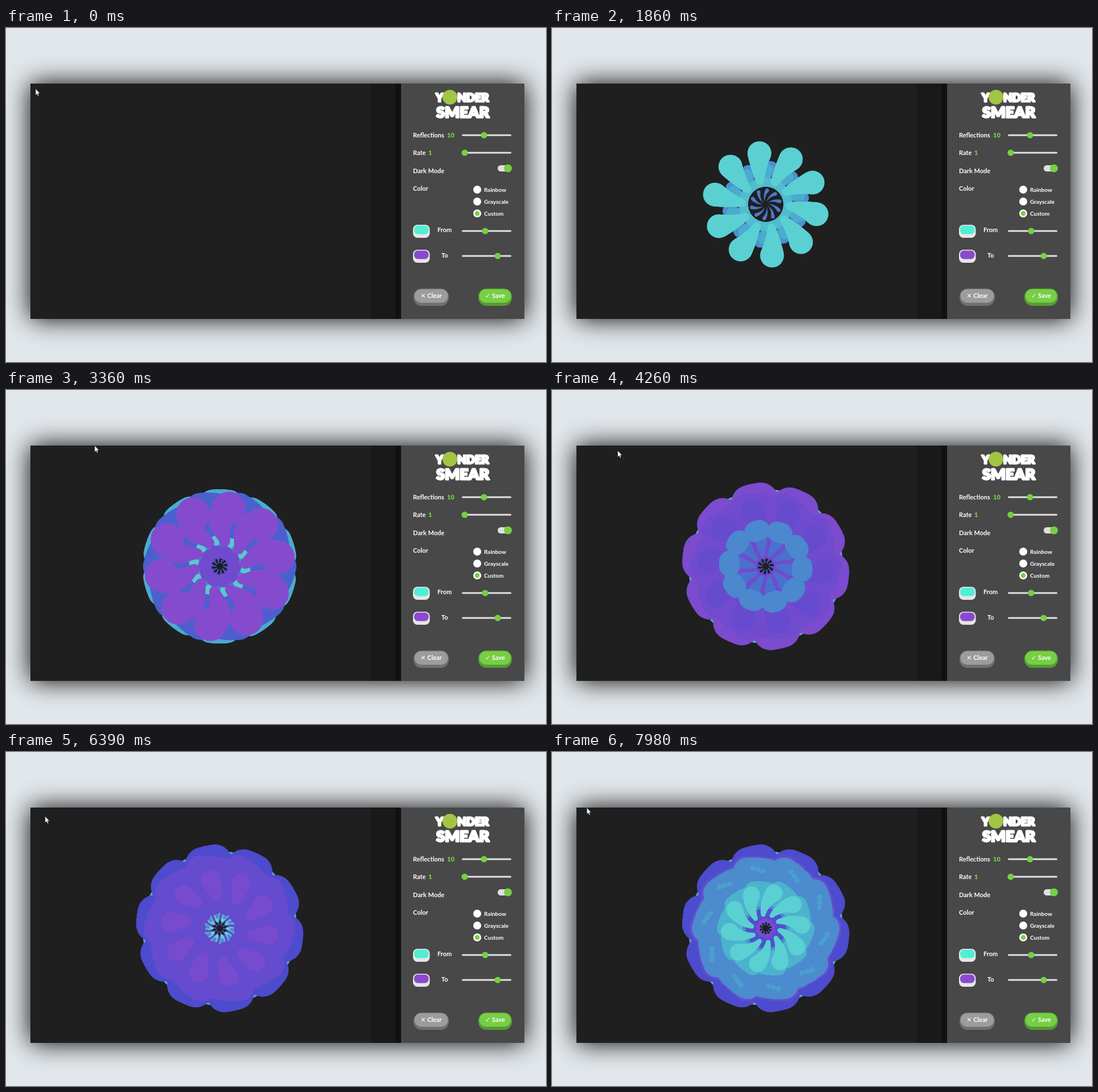
Recreate the animation shown at these times as an HTML page with a canvas. Size 950 by 589 pixels, loop 8 s.

```html
<!DOCTYPE html>
<html lang="en">
<head>
<meta charset="utf-8">
<title>Kaleidoscope painter</title>
<style>
  html, body { margin: 0; width: 100%; height: 100%; overflow: hidden; background: #e2e7eb; }
  #stage { position: relative; width: 950px; height: 589px; overflow: hidden; }
  #card { position: absolute; left: 43px; top: 98px; width: 869px; height: 415px; background: #1f1f1f; box-shadow: 0 0 42px #000; }
  canvas, svg { position: absolute; left: 0; top: 0; }
  text { font: 700 11px Lato, "DejaVu Sans", sans-serif; fill: #fff; }
  .small { font-size: 10px; }
  .value { font-weight: 900; fill: #76cf45; }
  .logo { font-weight: 900; stroke: #fff; stroke-width: 3; stroke-linejoin: round; }
</style>
</head>
<body>
<div id="stage">
  <div id="card"></div>
  <canvas width="950" height="589"></canvas>
  <svg width="950" height="589">
    <defs><clipPath id="board"><rect x="43" y="98" width="599" height="415"/></clipPath></defs>
    <rect x="642" y="98" width="43" height="415" fill="#191919"/>
    <rect x="685" y="98" width="10" height="415" fill="#111"/>
    <rect x="695" y="98" width="217" height="415" fill="#484848"/>

    <text class="logo" x="756" y="130" style="font-size:20px">Y</text>
    <text class="logo" x="794" y="130" style="font-size:20px">NDER</text>
    <text class="logo" x="757" y="158" style="font-size:27px">SMEAR</text>
    <circle cx="781" cy="122" r="13" fill="#a3c544"/>

    <text x="716" y="193">Reflections</text><text class="value" x="776" y="193">10</text>
    <text x="716" y="224">Rate</text><text class="value" x="743" y="224">1</text>
    <text x="716" y="256">Dark Mode</text>
    <text x="716" y="287">Color</text>
    <text x="759" y="360">From</text>
    <text x="766" y="405">To</text>

    <rect x="865" y="242" width="23" height="11" rx="5.5" fill="#e0e0e0"/>
    <circle cx="883" cy="247.5" r="7" fill="#76cf45"/>
    <g id="controls"></g>

    <g clip-path="url(#board)">
      <path id="cursor" d="M0 0V11.5L2.6 9.2 4.3 13 6.1 12.2 4.4 8.5H7.8Z" fill="#fff" stroke="#111" stroke-width=".6"/>
    </g>
  </svg>
</div>
<script>
const LOOP = 8000, STEP = 30, ARMS = 10, SECTOR = 360 / ARMS, CX = 376, CY = 311;
const ctx = document.querySelector('canvas').getContext('2d');
const cursor = document.getElementById('cursor');
const mix = (a, b, k) => a + (b - a) * k;

// Side panel controls
const slider = (y, knob) =>
  `<rect x="802" y="${y - 1.5}" width="87" height="3" rx="1.5" fill="#e2e2e2"/>
   <circle cx="${knob}" cy="${y}" r="5.6" fill="#76cf45"/>`;
const radio = (y, label, on) =>
  `<circle cx="829" cy="${y}" r="7" fill="#fff"/>
   ${on ? `<circle cx="829" cy="${y}" r="4.2" fill="#76cf45"/>` : ''}
   <text class="small" x="841" y="${y + 4}">${label}</text>`;
const swatch = (y, color) =>
  `<rect x="716" y="${y}" width="29.5" height="23" rx="8" fill="#e6e6e6"/>
   <rect x="718" y="${y + 1.5}" width="25.5" height="15" rx="6.5" fill="${color}"/>`;
const button = (x, width, label, top, base) =>
  `<rect x="${x}" y="460" width="${width}" height="30" rx="14" fill="${base}"/>
   <rect x="${x + 1}" y="460" width="${width - 2}" height="25" rx="12.5" fill="${top}" stroke="${base}"/>
   <text x="${x + width / 2}" y="476" text-anchor="middle">${label}</text>`;
document.getElementById('controls').innerHTML =
  slider(189, 841) + slider(220, 807) + slider(358, 843) + slider(402, 865) +
  radio(285, 'Rainbow') + radio(306, 'Grayscale') + radio(327, 'Custom', true) +
  swatch(347, '#50eed5') + swatch(391, '#8a49cf') +
  button(717, 62, '✕ Clear', '#9c9c9c', '#707070') +
  button(831, 59, '✓ Save', '#76cf45', '#559b33');

// Linear interpolation through rows of [time, ...values]
function along(keys, time) {
  const n = Math.max(1, keys.findIndex(key => key[0] > time));
  const [t0, ...a] = keys[n - 1], [t1, ...b] = keys[n];
  return a.map((v, i) => mix(v, b[i], (time - t0) / (t1 - t0)));
}

// The brush hue swings between the two chosen colors, cyan and purple
const hueTurns = [[0, 270], [1880, 180], [1900, 172], [3300, 270], [4700, 195], [5600, 174], [6500, 270], [LOOP, 180]];
function brushColor(time) {
  const [hue] = along(hueTurns, time);
  return `hsl(${hue} 57% ${55 + Math.max(0, 195 - hue) * .28}%)`;
}

// Discs laid from one [distance, angle] to another; taper shrinks them toward the center
const stamps = [];
function stroke(start, end, from, to, size, { taper = 0, bend = 0, gap = 8 } = {}) {
  const count = Math.round((end - start) / gap), color = brushColor(end);
  for (let i = 0; i <= count; i++) {
    const k = i / count, distance = mix(from[0], to[0], k);
    stamps.push({
      time: mix(start, end, k), distance, color,
      angle: mix(from[1], to[1], k) + bend * Math.sin(Math.PI * k),
      radius: size * (distance / to[0]) ** taper
    });
  }
}
const petal = (start, end, from, to, size, bend) => stroke(start, end, from, to, size, { taper: 1.4, bend });
const dots = (start, end, from, to, size) => stroke(start, end, from, to, size, { taper: 1.2, gap: 35 });
const ring = (start, end, outer, inner, size, turns = 1) =>
  stroke(start, end, [outer, 0], [inner, SECTOR * turns], size);

// Broad purple flower with soft darker petals
function bloom(start) {
  stroke(start, start + 50, [117, 3], [118, 14], 30);
  ring(start + 58, start + 150, 104, 55, 30, 3);
  petal(start + 160, start + 230, [60, 12], [100, 5], 21);
}

// Star of dots, then the first flower
dots(750, 1050, [6, 0], [25, 24], 3.2);
petal(1070, 1300, [38, 16], [66, 26], 11);
stroke(1400, 1560, [62, 22], [44, 14], 9);
ring(1570, 1680, 39, 39, 8);
petal(1690, 1860, [42, 4], [91, 11], 21);
// Full disc with a teal rim and blue petals
ring(1880, 2070, 98, 55, 22, 3);
stroke(2090, 2240, [116, 11], [116, 27], 20);
dots(2260, 2440, [7, 6], [34, 20], 5.5);
petal(2450, 2550, [42, -11], [95, 4], 20);
// Blue disc and purple swirl
ring(2570, 2730, 108, 80, 27, 2);
dots(2760, 2900, [7, 0], [16, 14], 2.5);
ring(2950, 3120, 33, 19, 5.5, 3);
petal(3150, 3360, [45, 30], [104, 27], 29, -10);
bloom(3390);
// Teal wreath around small cyan petals
petal(3990, 4180, [22, 2], [46, 8], 10.5);
stroke(4200, 4380, [64, 0], [66, 28], 18);
ring(4440, 4690, 63, 61, 14);
dots(4700, 4770, [48, 6], [52, 20], 1.6);
petal(4800, 5430, [13, 0], [28, 8], 5.5);
// Blue growth, covered by purple again
petal(5610, 5930, [20, 5], [98, 40], 23);
ring(5940, 6090, 98, 90, 23);
bloom(6180);
// Violet rosette
stroke(6430, 6560, [79, 2], [79, 18], 22);
ring(6570, 6640, 70, 30, 20, 2);
stroke(6660, 6800, [67, 0], [67, 18], 20);
ring(6810, 6890, 60, 26, 10, 4);
petal(6940, 7080, [26, 18], [44, 7], 13);
// Blue disc, teal wreath and cyan petals
petal(7100, 7240, [46, 12], [100, 20], 24);
ring(7260, 7490, 105, 60, 25, 3);
dots(7560, 7640, [101, 15], [109, 6], 5);
ring(7650, 7780, 71, 55, 15, 2);
petal(7810, 7980, [25, 8], [64, 31], 15);

function paint(time) {
  ctx.clearRect(0, 0, 950, 589);
  for (const s of stamps) {
    if (s.time > time) break;
    ctx.fillStyle = s.color;
    ctx.beginPath();
    for (let arm = 0; arm < ARMS; arm++) {
      const a = (s.angle + arm * SECTOR) * Math.PI / 180;
      const x = CX + s.distance * Math.cos(a), y = CY + s.distance * Math.sin(a);
      ctx.moveTo(x + s.radius, y);
      ctx.arc(x, y, s.radius, 0, 7);
    }
    ctx.fill();
  }
}

// The pointer leaves over the top edge and drifts back in later
const cursorPath = [[0, 52, 107], [450, 46, 40], [3360, 156, 98], [5430, 63, 118], [7080, 73, 110], [LOOP, 61, 98]];

let shown = -1;
function frame() {
  const time = Math.floor(performance.now() % LOOP / STEP) * STEP;
  if (time !== shown) {
    paint(time);
    cursor.setAttribute('transform', `translate(${along(cursorPath, time)})`);
    shown = time;
  }
  requestAnimationFrame(frame);
}
frame();
</script>
</body>
</html>
```
